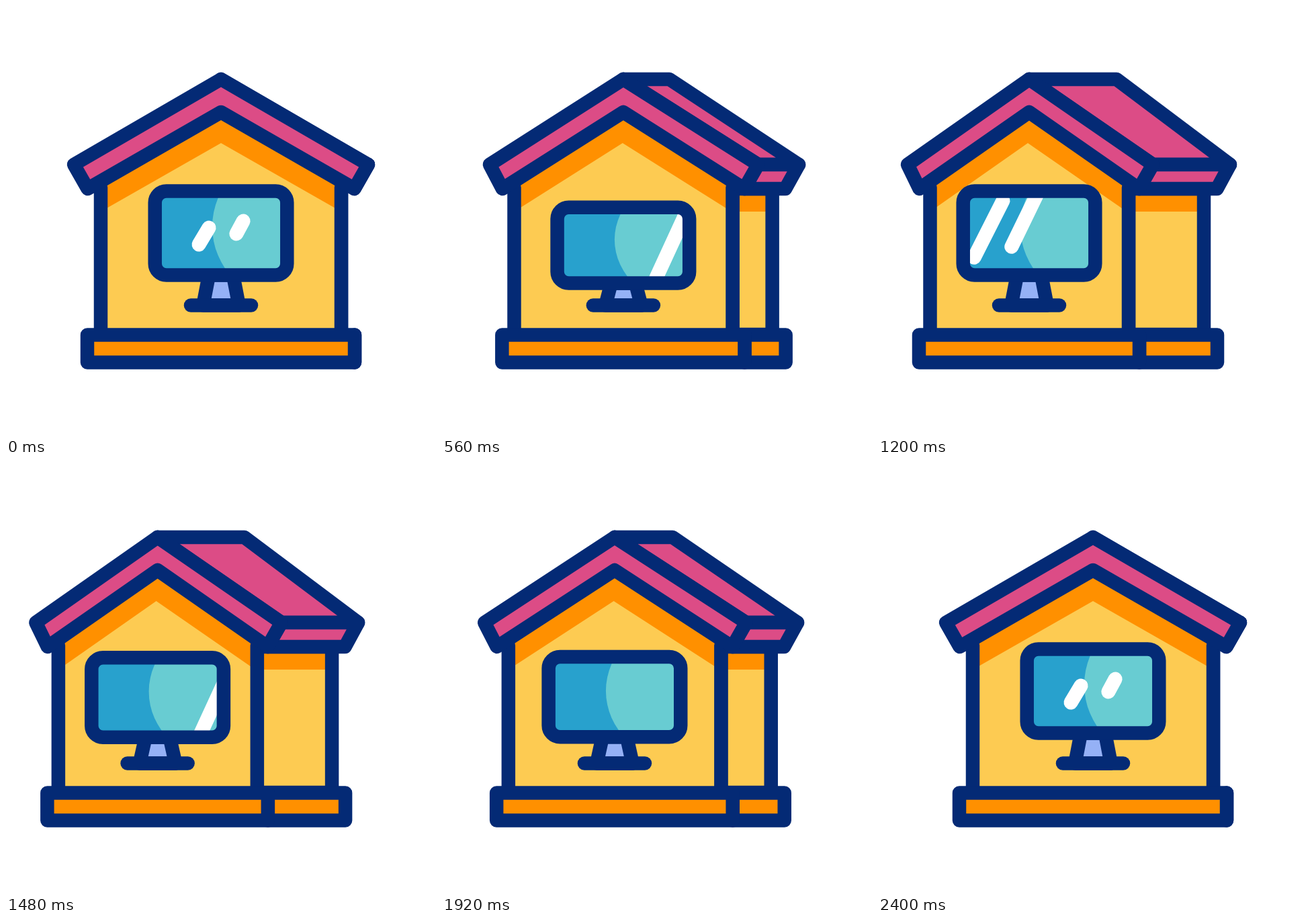
Recreate the animation shown at these times as an HTML page with a canvas. Size 640x640 px, loop 3 s.

```html
<!DOCTYPE html>
<html lang="en">
<head>
<meta charset="utf-8">
<title>Working from home</title>
<style>
html, body { margin: 0; width: 100%; height: 100%; overflow: hidden; background: #fff; }
canvas { display: block; width: 640px; height: 640px; }
</style>
</head>
<body>
<canvas id="stage" width="640" height="640"></canvas>
<script>
const ctx = document.getElementById('stage').getContext('2d');
const LOOP = 3000;
const NAVY = '#042a75', PINK = '#dc4c86', ORANGE = '#ff9000', YELLOW = '#fdcb52';
const BLUE = '#28a1cd', AQUA = '#68ccd2', LILAC = '#95b1f6';
const LINE = 20.5;

const clamp = (v, lo, hi) => Math.min(hi, Math.max(lo, v));

// Cubic Bezier easing with flat ends; x1 and x2 are the handle positions.
function ease(x, x1, x2) {
  x = clamp(x, 0, 1);
  let lo = 0, hi = 1;
  for (let i = 0; i < 24; i++) {
    const s = (lo + hi) / 2, r = 1 - s;
    if (3 * s * r * r * x1 + 3 * s * s * r * x2 + s * s * s < x) lo = s; else hi = s;
  }
  return lo * lo * (3 - 2 * lo);
}

// How far the house is turned: 0 is front view, 1 is fully turned.
const turnAt = t => t < 1355
  ? ease((t - 230) / 980, 0.55, 0)
  : 1 - ease((t - 1355) / 1045, 0.93, 0.28);

// Squash of the monitor, as [time, amount] keys joined by cosine easing.
const SQUASH = [[0, 0], [240, 0], [520, 1.03], [880, -0.14], [1080, 0], [1320, 0],
  [1640, 1.03], [2200, -0.08], [2400, 0], [LOOP, 0]];

function squashAt(t) {
  const i = SQUASH.findIndex(k => k[0] > t);
  const [t0, a] = SQUASH[i - 1], [t1, b] = SQUASH[i];
  return a + (b - a) * (1 - Math.cos(Math.PI * (t - t0) / (t1 - t0))) / 2;
}

// Horizontal offset of the glints: slide out, sweep across, slide back in.
function glintAt(t) {
  if (t < 240 || t >= 2400) return 0;
  if (t < 880) return 0.001 * (t - 240) ** 2;
  if (t < 1760) return 116 + (t - 1480) * 0.56;
  return -0.00078 * (2400 - t) ** 2;
}

function path(points, fill, stroke = NAVY, closed = true, width = LINE) {
  ctx.beginPath();
  points.forEach(p => ctx.lineTo(...p));
  if (closed) ctx.closePath();
  if (fill) { ctx.fillStyle = fill; ctx.fill(); }
  if (stroke) { ctx.strokeStyle = stroke; ctx.lineWidth = width; ctx.stroke(); }
}

const box = (x0, y0, x1, y1, fill, stroke) =>
  path([[x0, y0], [x1, y0], [x1, y1], [x0, y1]], fill, stroke);

function drawGlint(x, y, half, rest, shift) {
  const far = Math.abs(shift);
  const slope = rest + (0.46 - rest) * Math.min(1, far / 60);
  const up = half + Math.min(110, far), down = half + Math.min(110, far * 0.48);
  const mid = x + shift;
  path([[mid + up * slope, y - up], [mid - down * slope, y + down]], null, '#fff', false, 21);
}

function drawMonitor(cx, squash, shift) {
  const top = 275.5 + 24.5 * squash, bottom = 400.5 + 12 * squash, h = bottom - top;
  ctx.save();
  ctx.translate(cx, 0);
  path([[-26.7, 445.5], [-18, bottom], [18, bottom], [26.7, 445.5]], LILAC);
  path([[-45, 445.5], [45, 445.5]], null, NAVY, false);

  ctx.beginPath();
  ctx.roundRect(-98.3, top, 196.6, h, 17);
  ctx.save();
  ctx.clip();
  ctx.fillStyle = BLUE;
  ctx.fillRect(-100, top, 200, h);
  const inner = h - LINE;
  ctx.beginPath();
  ctx.ellipse(98, top + LINE / 2 + inner * 0.41, 111, 111 * inner / 105, 0, 0, 2 * Math.PI);
  ctx.fillStyle = AQUA;
  ctx.fill();
  drawGlint(-25.5, 342.5, 12.5, 0.6, shift);
  drawGlint(28, 329.5, 9.5, 0.54, shift);
  ctx.restore();

  ctx.beginPath();
  ctx.roundRect(-98.3, top, 196.6, h, 17);
  ctx.strokeStyle = NAVY;
  ctx.lineWidth = LINE;
  ctx.stroke();
  ctx.restore();
}

function draw(t) {
  const u = turnAt(t);
  const apex = 320 - 95 * u, ridge = 320 + 35 * u;
  const wallL = 141 - 63.5 * u, wallR = 499 - 126 * u, wallBack = 499 - 14 * u;
  const baseL = 121 - 60 * u, baseR = 519 - 130 * u, baseBack = 519 - 14 * u;
  const eaveL = 101 - 57 * u, eaveR = 539 - 130 * u, eaveBack = 539 - 15 * u;
  const tipL = 121.5 - 60 * u, tipR = 518.5 - 130 * u, tipBack = 518.5 - 14 * u;

  ctx.fillStyle = '#fff';
  ctx.fillRect(0, 0, 640, 640);
  ctx.lineJoin = ctx.lineCap = 'round';

  // Side of the house
  box(wallR, 272, wallBack, 489, YELLOW, null);
  box(wallR, 272, wallBack, 306, ORANGE, null);
  box(wallR, 272, wallBack, 489);
  box(baseR, 489.5, baseBack, 530.5, ORANGE);
  path([[apex, 109], [ridge, 109], [eaveBack, 236], [eaveR, 236]], PINK);
  path([[eaveR, 236], [eaveBack, 236], [tipBack, 272], [tipR, 272]], PINK);

  // Front of the house
  const gable = [[wallL, 262], [apex, 158], [wallR, 262]];
  path([...gable, [wallR, 489], [wallL, 489]], YELLOW, null);
  path([...gable, [wallR, 306 + 2 * u], [apex - 2 * u, 204], [wallL, 306]], ORANGE, null);
  drawMonitor(apex, squashAt(t), glintAt(t));
  path([[wallL, 270], [wallL, 489]], null, NAVY, false);
  path([[wallR, 270], [wallR, 489]], null, NAVY, false);
  box(baseL, 489.5, baseR, 530.5, ORANGE);
  path([[eaveL, 236], [apex, 109], [eaveR, 236], [tipR, 272], [apex, 158], [tipL, 272]], PINK);
}

const start = performance.now();
function frame() {
  draw((performance.now() - start) % LOOP);
  requestAnimationFrame(frame);
}
frame();
</script>
</body>
</html>
```
